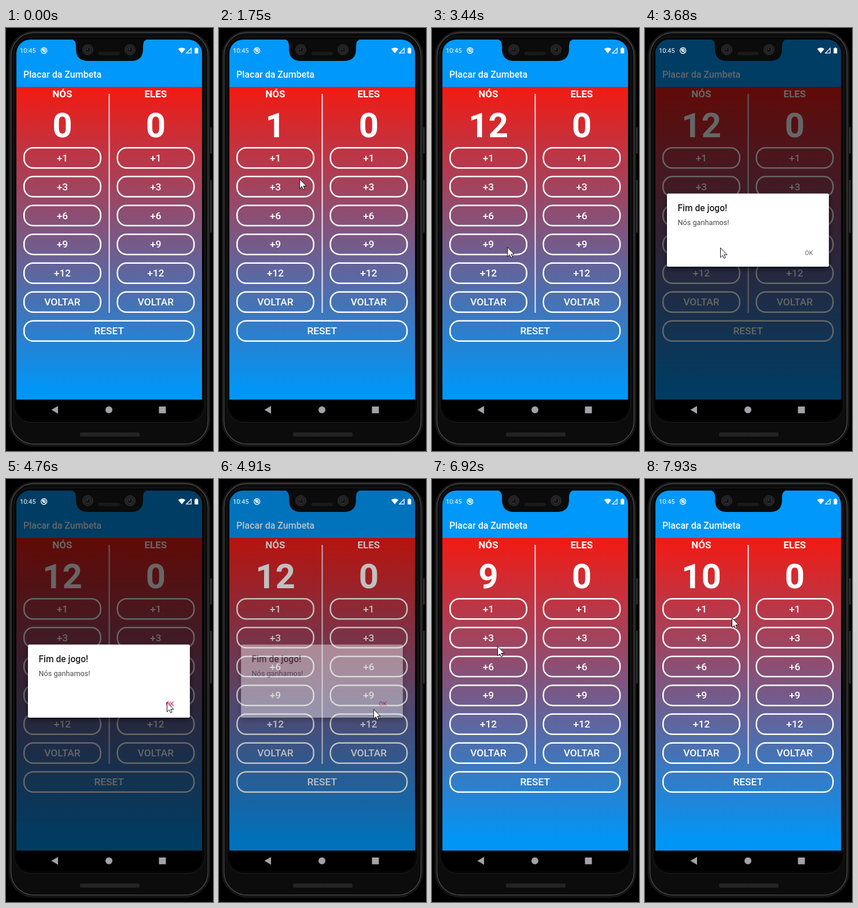
Write an HTML page that moves like this. It is 358 by 732 pixels and loops after 8000 ms.

```html
<!DOCTYPE html>
<html lang="pt">
<head>
<meta charset="utf-8">
<title>Placar</title>
<style>
  html, body { margin: 0; width: 100%; height: 100%; overflow: hidden; background: #000; }
  svg { display: block; width: 100%; height: 100%; }
  text { font-family: Roboto, Arial, sans-serif; }
  .name, .label, .score { text-anchor: middle; fill: #fff; }
  .name { font-size: 17px; font-weight: 700; }
  .label { font-size: 17.3px; font-weight: 500; }
  .score { font-size: 60px; font-weight: 700; }
  .button { fill: none; stroke: #fff; stroke-width: 2.5; }
</style>
</head>
<body>
<svg viewBox="0 0 358 732">
  <defs>
    <linearGradient id="table" x2="0" y2="1">
      <stop stop-color="#f31a12"/><stop offset=".97" stop-color="#0096f7"/>
    </linearGradient>
    <pattern id="mesh" width="3" height="3" patternUnits="userSpaceOnUse">
      <path d="M0 3 3 0" stroke="#3c3c3c" stroke-width=".9"/>
    </pattern>
    <filter id="shadow" x="-10%" y="-15%" width="120%" height="135%">
      <feDropShadow dx="0" dy="4" stdDeviation="4" flood-opacity=".55"/>
    </filter>
    <clipPath id="screen"><rect x="18" y="20" width="321" height="658" rx="24"/></clipPath>
  </defs>

  <rect width="358" height="732"/>
  <path d="M354.5 172V217M354.5 263V354" stroke="#2a2a2a" stroke-width="3"/>
  <rect x="5.5" y="5.5" width="347" height="718" rx="43" fill="#101010" stroke="#262626"/>
  <rect x="8.5" y="8" width="341" height="712" rx="40" fill="#0c0c0c" stroke="#484848" stroke-width="1.5"/>
  <rect x="14" y="15.5" width="329.5" height="667" rx="29" fill="#050505" stroke="#1d1d1d"/>

  <g clip-path="url(#screen)">
    <rect x="18" y="20" width="321" height="82" fill="#0098fa"/>
    <rect x="18" y="102" width="321" height="541" fill="url(#table)"/>
    <g id="board">
      <text x="30" y="86" font-size="16" font-weight="500" fill="#fff">Placar da Zumbeta</text>
      <path d="M178.5 114V493" stroke="#f0e8f2" stroke-width="2"/>
    </g>
    <rect id="dim" x="18" y="20" width="321" height="623"/>
    <rect x="18" y="643" width="321" height="35"/>
  </g>

  <path d="M111 19Q121 20 121 31V36Q121 57 142 57H216Q237 57 237 36V31Q237 20 247 19Z" fill="#0b0b0b"/>
  <g id="lenses"></g>
  <rect x="160" y="41" width="37" height="6" rx="3" fill="url(#mesh)"/>
  <rect x="128" y="700" width="103" height="7" rx="2" fill="#191919"/>
  <rect x="128" y="700" width="103" height="7" rx="2" fill="url(#mesh)"/>

  <g fill="#fff">
    <text x="24" y="43" font-size="11">10:45</text>
    <g fill="none" stroke="#fff" stroke-width="1.3">
      <circle cx="65.7" cy="39" r="5"/>
      <circle cx="65.7" cy="38.6" r="2.1"/>
      <path d="M62.5 36 69 42.5"/>
    </g>
    <path d="M297.8 36.2Q304 32 310.2 36.2L304 43.8Z"/>
    <path d="M320.3 35V43.3H312Z" fill="none" stroke="#fff" stroke-width="1.2"/>
    <path d="M326.3 35H328V33.7H330.6V35H332.3V44H326.3Z"/>
  </g>

  <g fill="#a5a1aa">
    <path d="M78.5 660.7 90 654V667.4Z"/>
    <circle cx="178" cy="660.7" r="6"/>
    <rect x="264.5" y="655" width="12" height="11.7"/>
  </g>

  <g id="dialog">
    <rect x="38" y="286.5" width="280" height="126.5" rx="2" fill="#fff" filter="url(#shadow)"/>
    <text x="56.5" y="317" font-size="15.6" font-weight="500" fill="#212121">Fim de jogo!</text>
    <text x="56.5" y="341" font-size="12.7" fill="#484848">Nós ganhamos!</text>
    <text id="ok" x="276.5" y="393" font-size="10.5" font-weight="500">OK</text>
  </g>

  <path id="cursor" d="M.5.5V17L4.3 13.5 6.7 18.7 9.2 17.6 6.9 12.4H12Z" fill="#fff" stroke="#000" stroke-width=".9"/>
</svg>

<script>
const LOOP = 8000, FIRST = 286, STEP = 77, GOAL = 12;
const $ = id => document.getElementById(id);

// pointer moves: start, end, then where the tip comes to rest
const entry = [226, 540];
const moves = [
  [285, 515, 197, 274],
  [820, 1130, 135, 221],
  [1280, 2050, 140, 268],
  [2050, 2650, 146, 322],
  [2680, 3440, 130, 380],
  [3890, 4740, 278, 386],
  [4880, 5370, 171, 506],
  [5500, 5670, 186, 521],
  [5830, 5984, 158, 453],
  [5984, 6610, 97, 366],
  [6740, 7215, 125, 234],
  [7600, 7930, 150, 240]
];
// button presses: time, points
const presses = [[1280, 1], [2060, 3], [2680, 6], [3290, 9], [5660, -GOAL], [6740, 9], [7600, 1]];

const clamp = (v, low, high) => Math.max(low, Math.min(high, v));
const ramp = (t, from, to) => clamp((t - from) / (to - from), 0, 1);
const easeOut = k => 1 - (1 - k) ** 2;

function button(x, y, width, label) {
  return `<rect class="button" x="${x}" y="${y - 17.3}" width="${width}" height="35" rx="16"/>
    <text class="label" x="${x + width / 2}" y="${y + 6.2}">${label}</text>`;
}

function column(x, name, id) {
  const labels = ['+1', '+3', '+6', '+9', '+12', 'VOLTAR'];
  return `<text class="name" x="${x + 66.2}" y="120">${name}</text>
    <text class="score" id="${id}" x="${x + 66.2}" y="189">0</text>` +
    labels.map((label, i) => button(x, 224.5 + i * 49.9, 132.5, label)).join('');
}

function lens(x) {
  return `<circle cx="${x}" cy="37.5" r="9" fill="#202022" stroke="#303033"/>
    <circle cx="${x}" cy="37.5" r="4.5" fill="#121216" stroke="#3c3c40"/>
    <circle cx="${x - 1}" cy="36.5" r="1.2" fill="#444"/>`;
}

$('lenses').innerHTML = lens(141.5) + lens(214.5);
$('board').innerHTML += column(31.2, 'NÓS', 'us') + column(192.7, 'ELES', 'them') +
  button(31.2, 524, 294, 'RESET');

function pointer(t) {
  return moves.reduce(([x, y], [from, to, toX, toY]) => {
    const k = easeOut(ramp(t, from, to));
    return [x + (toX - x) * k, y + (toY - y) * k];
  }, entry);
}

function score(t) {
  return presses.filter(p => p[0] <= t)
    .reduce((sum, p) => clamp(sum + p[1], 0, GOAL), 0);
}

function draw(time) {
  const t = FIRST + Math.floor((time - FIRST) / STEP) * STEP;
  const [x, y] = pointer(t).map(Math.round);
  $('cursor').setAttribute('visibility', t < FIRST ? 'hidden' : 'visible');
  $('cursor').setAttribute('transform', `translate(${x} ${y})`);
  $('us').textContent = score(t);

  const open = ramp(t, 3550, 3670) * (1 - ramp(t, 4800, 4980));
  $('dim').setAttribute('opacity', 0.6 * open);
  $('dialog').setAttribute('opacity', open);
  $('ok').setAttribute('fill', t > 4660 ? '#f0307c' : '#858585');
}

function tick(now) {
  draw(now % LOOP);
  requestAnimationFrame(tick);
}
draw(0);
requestAnimationFrame(tick);
</script>
</body>
</html>
```
